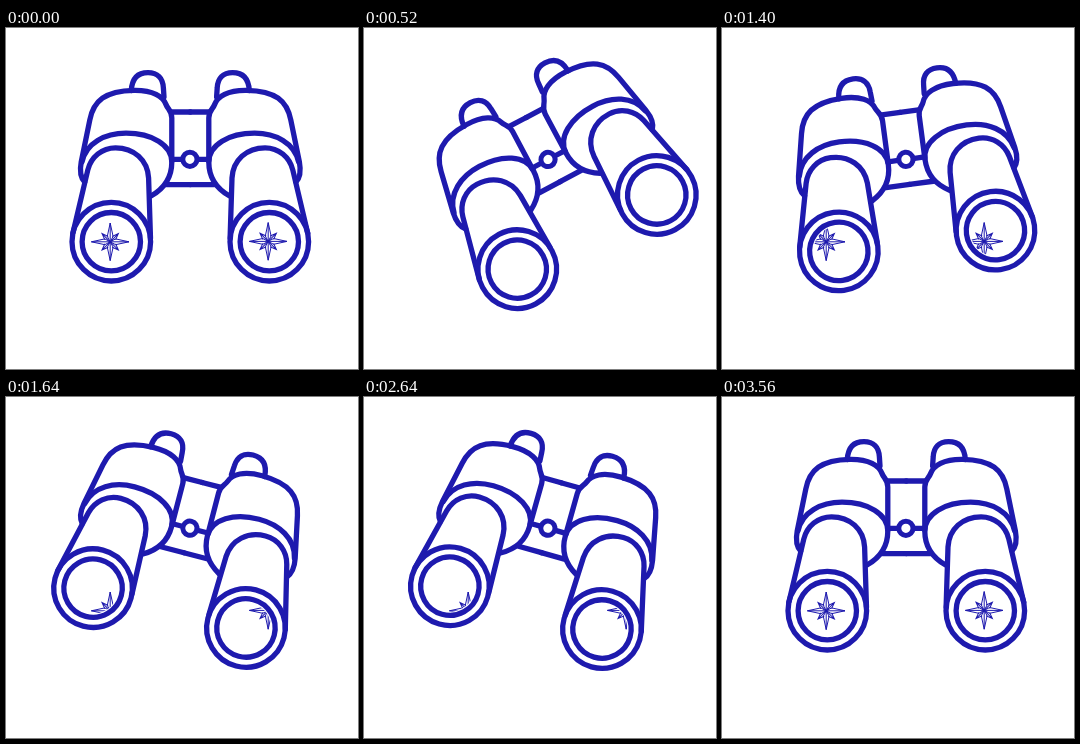
An HTML page with a canvas that plays this animation: 352x341 px, repeating every 4.04 s.

```html
<!DOCTYPE html>
<html lang="en">
<head>
<meta charset="utf-8">
<title>Binoculars</title>
<style>
html, body { margin: 0; width: 100%; height: 100%; overflow: hidden; background: #fff; }
canvas { display: block; width: 352px; height: 341px; }
</style>
</head>
<body>
<canvas id="stage"></canvas>
<script>
const W = 352, H = 341, LOOP = 4040, STEP = 40;
const BLUE = '#1e1aae';
const TILT = 28;
const PIVOT = { x: 184.3, y: 131.2 };
const LENS = { x: -79, y: 82.5, outer: 39.3, inner: 29.2, glass: 25.5 };
const STARS = [{ x: 104.2, y: 213.8 }, { x: 262.2, y: 213.4 }];

const canvas = document.getElementById('stage');
const ctx = canvas.getContext('2d');
const dpr = window.devicePixelRatio || 1;
canvas.width = W * dpr;
canvas.height = H * dpr;

// Left half in stage coordinates; the right half is its mirror image.
const half = [
  'M125.3 62.5C126 50 132 44.6 142 44.6C151.5 44.6 157 50 157.4 60L158 69',
  'M78.6 154C74.4 149.5 73.8 141.5 75.2 134L83.8 92C87.5 73 99 62.8 128 62.3C147 62 157.2 68.5 160 76.5C161.6 81 165.8 82.5 165.8 90V133',
  'M76 134C80 115 99 105.2 120 105.2C146 105.2 165.6 117 165.8 134C165.8 151 157.5 161 145 168',
  'M66.9 205L81.8 142C85 129 96 119.8 109.5 119.8C128 119.8 141.6 132 142.6 150L144.5 210',
  'M165.8 84H184.4',
  'M160.5 156.6H184.4',
  'M166 131.4H176'
].map(d => new Path2D(d));

const spike = new Path2D('M0 0L-2.9 -5.4L0 -18.8L2.9 -5.4ZV-18.8');
const shortSpike = new Path2D('M-2.4 -5.2L0 -11.6L2.4 -5.2M0 0V-11.6');

function bezier(x1, x2) {
  return x => {
    let lo = 0, hi = 1;
    for (let i = 0; i < 24; i++) {
      const s = (lo + hi) / 2, r = 1 - s;
      if (3 * r * r * s * x1 + 3 * r * s * s * x2 + s * s * s < x) lo = s; else hi = s;
    }
    return lo * lo * (3 - 2 * lo);
  };
}

const smooth = bezier(1 / 3, 2 / 3);
const settle = bezier(1 / 3, 0.45);

function progress(t, start, end, ease) {
  if (t <= start) return 0;
  if (t >= end) return 1;
  return ease((t - start) / (end - start));
}

function tiltAt(t) {
  return TILT * (2 * progress(t, 1040, 1920, smooth)
    - progress(t, 0, 520, settle)
    - progress(t, 2440, 2960, settle));
}

function circle(x, y, r) {
  ctx.beginPath();
  ctx.arc(x, y, r, 0, Math.PI * 2);
}

function ring(x, y, r) {
  circle(x, y, r);
  ctx.stroke();
}

function drawStar(star, lens, spin) {
  ctx.save();
  circle(lens.x, lens.y, LENS.glass);
  ctx.clip();
  ctx.translate(star.x, star.y);
  ctx.rotate(spin);
  ctx.lineWidth = 1;
  ctx.lineJoin = 'miter';
  for (let i = 0; i < 4; i++) {
    ctx.stroke(spike);
    ctx.rotate(Math.PI / 4);
    ctx.stroke(shortSpike);
    ctx.rotate(Math.PI / 4);
  }
  ctx.restore();
}

function drawBinoculars(angle) {
  ctx.save();
  ctx.translate(PIVOT.x, PIVOT.y);
  ctx.rotate(angle);
  ctx.lineWidth = 5.3;
  ctx.lineJoin = ctx.lineCap = 'round';
  for (const side of [1, -1]) {
    ctx.save();
    ctx.scale(side, 1);
    ctx.save();
    ctx.translate(-PIVOT.x, -PIVOT.y);
    half.forEach(p => ctx.stroke(p));
    ctx.restore();
    ring(LENS.x, LENS.y, LENS.outer);
    ring(LENS.x, LENS.y, LENS.inner);
    ctx.restore();
  }
  ctx.lineWidth = 5;
  circle(-0.4, 0.1, 7.1);
  ctx.fill();
  ctx.stroke();
  ctx.restore();
}

function draw(t) {
  const angle = tiltAt(t) * Math.PI / 180;
  const spin = progress(t, 2960, 3560, smooth) * Math.PI * 2;
  const c = Math.cos(angle), s = Math.sin(angle);
  ctx.setTransform(dpr, 0, 0, dpr, 0, 0);
  ctx.fillStyle = '#fff';
  ctx.fillRect(0, 0, W, H);
  ctx.strokeStyle = BLUE;
  STARS.forEach((star, i) => {
    const x = i ? -LENS.x : LENS.x;
    const lens = { x: PIVOT.x + x * c - LENS.y * s, y: PIVOT.y + x * s + LENS.y * c };
    drawStar(star, lens, spin);
  });
  drawBinoculars(angle);
}

const begin = performance.now();
function tick() {
  const t = (performance.now() - begin) % LOOP;
  draw(Math.floor(t / STEP) * STEP);
  requestAnimationFrame(tick);
}
tick();
</script>
</body>
</html>
```
